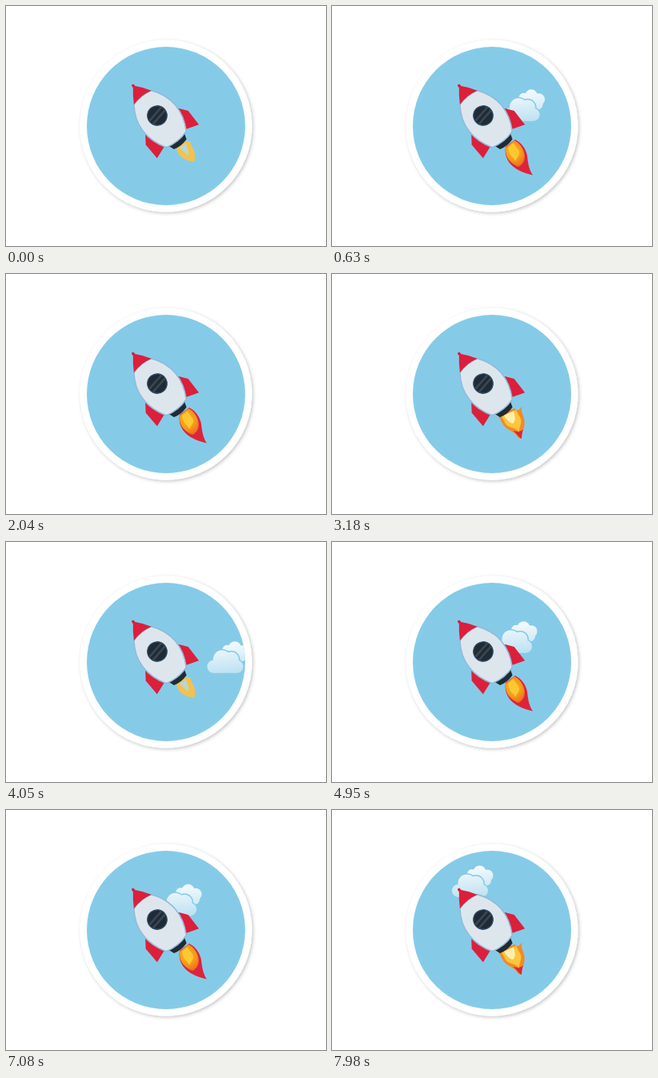
An HTML page for the animation above (8000 ms loop, 400 px wide and 300 px high).

```html
<!DOCTYPE html>
<html lang="en">
<head>
<meta charset="utf-8">
<title>Rocket</title>
<style>
  html, body { margin: 0; width: 100%; height: 100%; overflow: hidden; background: #fff; }
  svg { display: block; width: 100vw; height: 100vh; }
</style>
</head>
<body>
<svg viewBox="0 0 400 300">
  <defs>
    <clipPath id="porthole"><circle cx="200" cy="150" r="99"/></clipPath>
    <clipPath id="glass"><circle r="11.500"/></clipPath>
    <filter id="shadow" x="-10%" y="-10%" width="120%" height="120%">
      <feDropShadow dx="1.5" dy="1.5" stdDeviation="2" flood-color="#000" flood-opacity=".24"/>
    </filter>
    <linearGradient id="mist" gradientUnits="userSpaceOnUse" x1="260" y1="122" x2="264" y2="158">
      <stop offset="0" stop-color="#f1f9fd"/>
      <stop offset="1" stop-color="#bde1f2"/>
    </linearGradient>
    <radialGradient id="ember" gradientUnits="userSpaceOnUse" cx="226" cy="182" r="19">
      <stop offset="0" stop-color="#fcb21a"/>
      <stop offset=".55" stop-color="#f79a1c"/>
      <stop offset="1" stop-color="#ec6f22"/>
    </radialGradient>
    <g id="puff">
      <circle cx="247" cy="149" r="8"/>
      <circle cx="257.500" cy="139.500" r="11"/>
      <circle cx="269" cy="140" r="9.500"/>
      <circle cx="276" cy="149" r="8"/>
      <rect x="247" y="141" width="29" height="16"/>
    </g>
  </defs>

  <circle cx="200" cy="150" r="107.500" fill="#fff" filter="url(#shadow)"/>
  <circle cx="200" cy="150" r="99" fill="#85cbe8"/>

  <g clip-path="url(#porthole)">
    <g id="cloud" fill="url(#mist)">
      <circle cx="264" cy="128" r="6"/>
      <circle cx="273.500" cy="125.500" r="8"/>
      <circle cx="283" cy="130" r="7.500"/>
      <circle cx="281" cy="136" r="7"/>
      <rect x="265" y="126" width="16" height="14"/>
      <use href="#puff" stroke="#85cbe8" stroke-width="3"/>
      <use href="#puff"/>
    </g>
  </g>

  <g class="flame">
    <path fill="#f4c14c" d="M213 178 C215 188 224 194 236 194.500 C235 191 237 189 236 184 C235 178 231 176 230.500 169 L224 169 Z"/>
    <path fill="#b9d6cf" d="M217 177 C220 180 223 184 228 187 C230 182 226 177 225 171 Z"/>
  </g>
  <g class="flame">
    <path fill="#f28a26" d="M208 178 C212 183 213 190 220 194 C224 197 229 198 233 205 L237 206 C236 198 243 191 240 181 C239 176 236 173 237.500 166 C233 170 231 173 229 168 L220 170 Z"/>
    <path fill="#dd2638" d="M226 196 C230 198 232 203 237 206 C237 201 238 198 239 194 C235 198 231 197 226 196 Z"/>
    <path fill="#fbc53c" d="M212 178 C216 184 216 189 222 191 C227 193 231 193 234 198 C233 192 238 188 236 181 C234 177 232 174 230 170 Z"/>
    <path fill="#fff0b0" d="M215 177 C218 181 220 185 226 187 C231 183 228 177 227 171 Z"/>
  </g>
  <g class="flame">
    <path fill="#e0233c" d="M217 176 C215 188 221 198 231 204 C238 208 245 210 251 211.500 C246 204 245 196 244 187 C242 178 237 171 229 167 Z"/>
    <path fill="url(#ember)" d="M217 177 C216 187 221 196 233 201 C239 198 242 192 240.500 185 C239 177 234 171 228 168 Z"/>
    <path fill="#fdc930" d="M220 177 C220 184 225 188 230 194 C230 189 235 188 234 182 C232 177 228 175 227 171 Z"/>
  </g>

  <g transform="translate(189 137) rotate(-38.8)">
    <path fill="#202b35" d="M-13 37 L13 37 L10 46 Q0 49 -10 46 Z"/>
    <g fill="#dc1f3b">
      <path id="fin" d="M24 9 L27 10 L34 19.500 L33.500 41.500 L18 36 Z"/>
      <use href="#fin" transform="scale(-1 1)"/>
    </g>
    <path fill="#dee6ed" stroke="#8fbcdc" stroke-width="1.600"
          d="M-14 -29 Q0 -33 14 -29 C30 -8 29 17 16 38 Q0 43 -16 38 C-29 17 -30 -8 -14 -29 Z"/>
    <path fill="#dc1f3b" d="M-14 -29 Q-8 -39 -1.700 -46 L-1.700 -49 Q0 -51 1.700 -49 L1.700 -46 Q8 -39 14 -29 Q0 -33 -14 -29 Z"/>
    <circle r="12.500" fill="#1f2b36"/>
    <g clip-path="url(#glass)" stroke="#3b4750" stroke-width="2.600">
      <path d="M-13 -3 L13 -3 M-13 3 L13 3" transform="rotate(-10)"/>
    </g>
    <circle r="12.200" fill="none" stroke="#34506a" stroke-width="1.200"/>
  </g>
</svg>
<script>
  const LOOP = 8000, TICK = 30;
  const CLOUD_PERIOD = 1090, CLOUD_LEAD = 280, CLOUD_AT = 1320;
  const FLAME_HOLD = 80, FLAME_SHIFT = 60;

  const cloud = document.getElementById('cloud');
  const flames = [...document.querySelectorAll('.flame')];
  const mod = (a, n) => ((a % n) + n) % n;

  function draw(time) {
    const t = Math.floor(mod(time, LOOP) / TICK) * TICK;

    // The cloud drifts down to the right, gaining a little speed.
    const p = mod(t - CLOUD_AT + CLOUD_LEAD, CLOUD_PERIOD) - CLOUD_LEAD;
    const dx = -115 + 0.212 * p + 0.000036 * p * p;
    cloud.setAttribute('transform', `translate(${dx.toFixed(2)} ${(dx * 0.54).toFixed(2)})`);

    const active = Math.floor((t + FLAME_SHIFT) / FLAME_HOLD) % flames.length;
    flames.forEach((flame, i) => flame.setAttribute('visibility', i === active ? 'visible' : 'hidden'));
  }

  const start = performance.now();
  function frame() {
    draw(performance.now() - start);
    requestAnimationFrame(frame);
  }
  draw(0);
  requestAnimationFrame(frame);
</script>
</body>
</html>
```
